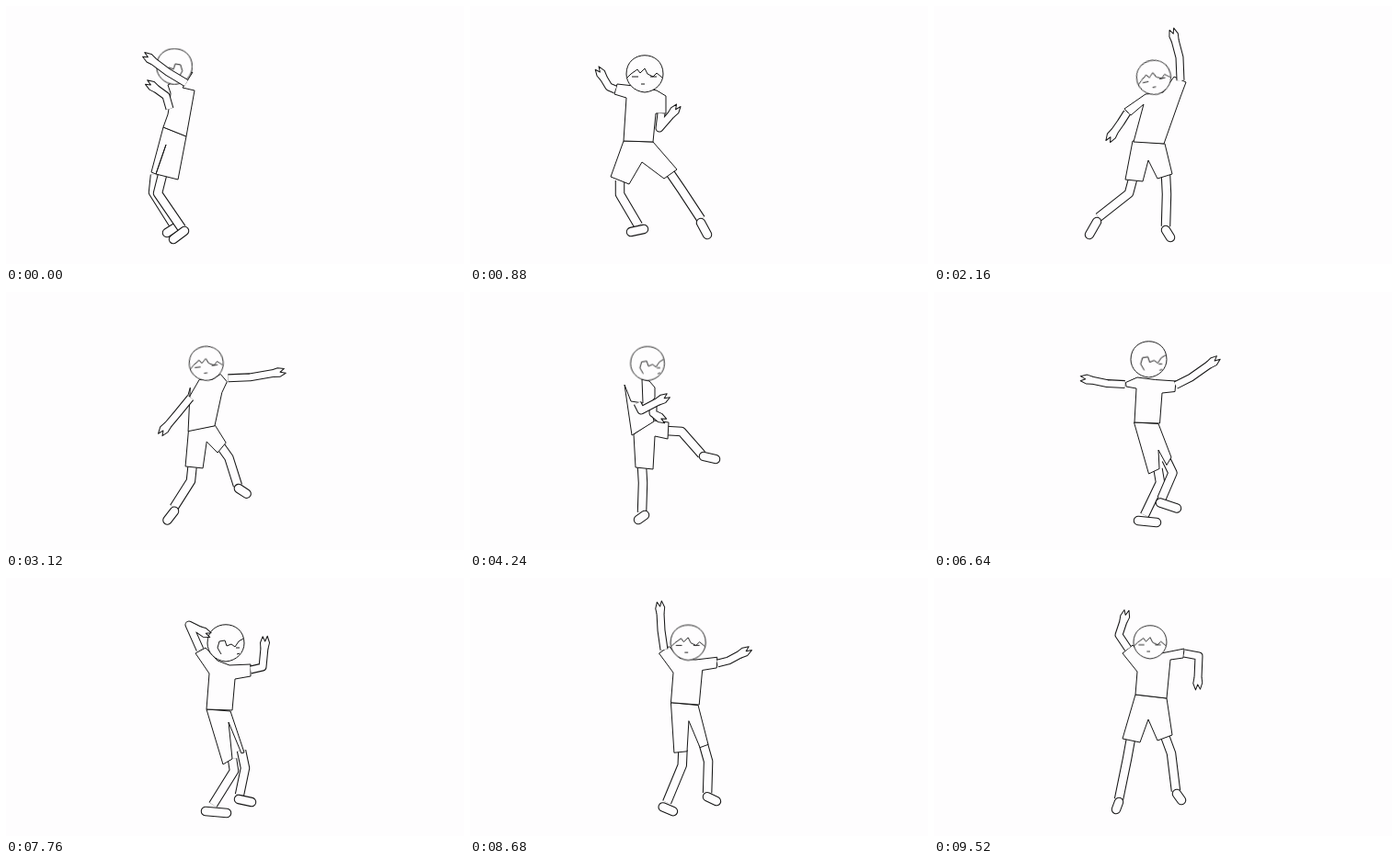
Recreate the animation shown at these times as an HTML page without scripts. Size 498 px wide and 281 px high, loop 9.68 s.

```html
<!DOCTYPE html>
<html lang="en">
<head>
<meta charset="utf-8">
<title>Dancing figure</title>
<style>
html, body { margin: 0; width: 100%; height: 100%; overflow: hidden; background: #fefdfe; }
svg { display: block; width: 100%; height: 100%; }
path { fill: #fefdfe; stroke: #161616; stroke-linejoin: round; }
g, path { animation: 0s steps(8) infinite; animation-duration: 9680ms; }

/* a limb is a wide dark line with a narrower light one on top */
.limb path { fill: none; stroke-width: 10.5px; }
.limb path + path { stroke: #fefdfe; stroke-width: 8.4px; }
.arm path { stroke-width: 9px; animation-timing-function: steps(4); }
.arm path + path { stroke-width: 6.9px; marker-end: url(#hand); }
.foot path { stroke-linecap: round; }

.leg-l path { animation-name: leg-l }
.leg-r path { animation-name: leg-r }
.foot-l path { animation-name: foot-l }
.foot-r path { animation-name: foot-r }
.arm-l path { animation-name: arm-l }
.arm-r path { animation-name: arm-r }
.shorts { animation-name: shorts }
.shirt { animation-name: shirt }
.head { animation-name: head }
.face { fill: none; opacity: 0; animation-timing-function: step-end }
.left { animation-name: left }
.front { animation-name: front }
.right { animation-name: right }

@keyframes leg-l {
  from, .82% { d: path("M162 184 160 203 182 238"); animation-timing-function: steps(5, jump-both) }
  9.09% { d: path("M163 190 163 205 183 239") }
  22.31% { d: path("M216 189 212 204 179 230"); animation-timing-function: steps(13) }
  43.8% { d: path("M187 190 188 208 187 240") }
  57.02% { d: path("M241 188 244 205 233 239"); animation-timing-function: steps(14) }
  80.16% { d: path("M246 197 248 210 225 247"); animation-timing-function: steps(12, jump-none) }
  to { d: path("M214 175 210 197 201 241") }
}
@keyframes leg-r {
  from, .82% { d: path("M170 184 165 204 191 242"); animation-timing-function: steps(5, jump-both) }
  9.09% { d: path("M217 181 230 200 251 232") }
  22.31% { d: path("M252 184 253 205 252 240"); animation-timing-function: steps(13) }
  43.8% { d: path("M213 151 230 152 252 177") }
  57.02% { d: path("M249 177 259 187 241 214"); animation-timing-function: steps(14) }
  80.16% { d: path("M256 188 260 207 254 236"); animation-timing-function: steps(12, jump-none) }
  to { d: path("M251 172 258 191 263 232") }
}
@keyframes foot-l {
  from, .82% { d: path("M183 242 175 247"); animation-timing-function: steps(5, jump-both) }
  9.09% { d: path("M189 243 175 246") }
  22.31% { d: path("M177 235 169 249"); animation-timing-function: steps(13) }
  43.8% { d: path("M190 243 183 248") }
  57.02% { d: path("M227 244 244 246"); animation-timing-function: steps(14) }
  80.16% { d: path("M217 254 240 256"); animation-timing-function: steps(12, jump-none) }
  to { d: path("M201 244 198 252") }
}
@keyframes foot-r {
  from, .82% { d: path("M194 245 182 254"); animation-timing-function: steps(5, jump-both) }
  9.09% { d: path("M251 236 258 249") }
  22.31% { d: path("M252 244 257 252"); animation-timing-function: steps(13) }
  43.8% { d: path("M254 179 267 182") }
  57.02% { d: path("M239 218 261 227"); animation-timing-function: steps(14) }
  80.16% { d: path("M253 241 267 244"); animation-timing-function: steps(12, jump-none) }
  to { d: path("M264 235 269 242") }
}
@keyframes shorts {
  from, .82% { d: path("M171 132 158 181 163 183 174 151 163 183 187 189 196 142Z"); animation-timing-function: steps(5, jump-both) }
  9.09% { d: path("M167 147 153 186 173 194 187 170 211 188 225 178 199 148Z") }
  22.31% { d: path("M216 147 208 189 227 191 233 168 243 188 259 183 251 150Z"); animation-timing-function: steps(13) }
  43.8% { d: path("M178 155 180 191 199 193 201 157 215 160 216 142 200 140Z") }
  57.02% { d: path("M217 141 231 193 244 188 246 187 250 186 257 170 244 142Z"); animation-timing-function: steps(14) }
  80.16% { d: path("M218 143 236 203 246 197 242 157 256 191 259 190 244 145Z"); animation-timing-function: steps(12, jump-none) }
  to { d: path("M219 127 205 175 224 179 233 154 243 177 259 171 253 131Z") }
}
@keyframes shirt {
  from, .82% { d: path("M176 86 179 95 178 106 176 118 171 132 196 142 205 92 192 89 198 80 203 72Z"); animation-timing-function: steps(5, jump-both) }
  9.09% { d: path("M178 87 160 85 157 96 170 100 167 147 199 148 202 117 213 117 213 98 203 92Z") }
  22.31% { d: path("M230 96 207 112 214 119 228 107 217 148 250 150 268 99 274 83 261 77 249 94Z"); animation-timing-function: steps(13) }
  43.8% { d: path("M187 95 188 121 175 119 168 101 176 156 200 141 196 122 201 115 201 104 195 97Z") }
  57.02% { d: path("M212 96 200 121 212 124 219 106 218 141 245 142 247 110 258 110 260 100 238 96Z"); animation-timing-function: steps(14) }
  80.16% { d: path("M230 90 217 76 206 82 221 104 218 143 246 144 249 110 266 107 266 94 243 95Z"); animation-timing-function: steps(12, jump-none) }
  to { d: path("M226 84 216 73 205 82 221 102 219 127 253 131 257 89 271 87 272 77 247 82Z") }
}
@keyframes head {
  from, .82% { transform: translate(183px, 66px) rotate(0deg) scale(.97); animation-timing-function: steps(5, jump-both) }
  9.09% { transform: translate(190px, 74px) rotate(0deg) scale(1) }
  22.31% { transform: translate(239px, 78px) rotate(-13deg) scale(.93); animation-timing-function: steps(13) }
  43.8% { transform: translate(193px, 78px) rotate(0deg) scale(.92) }
  57.02% { transform: translate(228px, 76px) rotate(0deg) scale(.95); animation-timing-function: steps(14) }
  80.16% { transform: translate(239px, 71px) rotate(0deg) scale(1); animation-timing-function: steps(12, jump-none) }
  to { transform: translate(235px, 70px) rotate(0deg) scale(.9) }
}
@keyframes left { from { opacity: 1 } 4.13%, to { opacity: 0 } }
@keyframes front { 4.13%, 88.42% { opacity: 1 } from, 33.88% { opacity: 0 } to { opacity: 1 } }
@keyframes right { 33.88% { opacity: 1 } from, 88.42%, to { opacity: 0 } }

/* cuff, elbow, wrist */
@keyframes arm-l {
  from, .82% { d: path("M178 112 174 98 163 90"); animation-timing-function: steps(2, jump-both) }
  4.13% { d: path("M166 97 146 94 130 89"); animation-timing-function: steps(3) }
  9.09% { d: path("M158 91 151 88 145 78") }
  15.7% { d: path("M184 104 165 104 138 104") }
  22.31% { d: path("M210 116 203 127 196 137"); animation-timing-function: steps(7) }
  33.88% { d: path("M199 115 184 133 172 147"); animation-timing-function: steps(6) }
  43.8% { d: path("M182 121 186 129 205 119"); animation-timing-function: steps(8) }
  57.02% { d: path("M206 122 195 138 185 149"); animation-timing-function: steps(6) }
  66.94% { d: path("M207 105 186 108 167 108"); animation-timing-function: steps(5) }
  75.2% { d: path("M210 83 198 66 190 49"); animation-timing-function: steps(3) }
  80.16% { d: path("M211 78 199 51 211 57"); animation-timing-function: steps(5) }
  88.42% { d: path("M211 78 208 57 207 38"); animation-timing-function: steps(7, jump-none) }
  to { d: path("M211 77 201 62 206 47") }
}
@keyframes arm-r {
  from, .82% { d: path("M196 84 176 72 160 60"); animation-timing-function: steps(2, jump-both) }
  4.13% { d: path("M205 100 205 116 205 131"); animation-timing-function: steps(3) }
  9.09% { d: path("M208 117 206 133 219 118") }
  15.7% { d: path("M238 99 265 94 289 87") }
  22.31% { d: path("M268 81 267 56 262 37"); animation-timing-function: steps(7) }
  33.88% { d: path("M237 96 265 99 296 97"); animation-timing-function: steps(6) }
  43.8% { d: path("M199 121 199 132 202 134"); animation-timing-function: steps(8) }
  57.02% { d: path("M259 105 266 104 262 91"); animation-timing-function: steps(6) }
  66.94% { d: path("M262 102 280 99 304 92"); animation-timing-function: steps(5) }
  75.2% { d: path("M266 100 276 70 281 27"); animation-timing-function: steps(3) }
  80.16% { d: path("M266 100 279 97 281 76"); animation-timing-function: steps(5) }
  88.42% { d: path("M269 93 281 90 294 83"); animation-timing-function: steps(7, jump-none) }
  to { d: path("M272 82 288 85 287 109") }
}
</style>
</head>
<body>
<svg viewBox="0 0 498 281" preserveAspectRatio="none">
  <marker id="hand" orient="auto" markerUnits="userSpaceOnUse" markerWidth="20" markerHeight="20" overflow="visible">
    <path d="M-1-4 5-5 12-3 7 0 13 2 6 5-1 4"/>
  </marker>
  <g class="limb leg-l"><path/><path/></g>
  <g class="limb foot foot-l"><path/><path/></g>
  <g class="limb leg-r"><path/><path/></g>
  <g class="limb foot foot-r"><path/><path/></g>
  <path class="shorts"/>
  <path class="shirt"/>
  <g class="head">
    <path d="M-20 0C-20-27 20-27 20 0C20 10 12 19 0 20C-12 19-20 10-20 0Z"/>
    <path class="face front" d="M-19 4-15 0-8-5-5-1 0-6 3 0 9 3 13-1 19 4M-14 3H-7M6 3H13M-4 11H0"/>
    <g transform="scale(-1 1)"><path class="face left" d="M-5 12-9 5-7-2-1-3 1 3 6 1 10 4 14-2 19-5"/></g>
    <path class="face right" d="M-5 12-9 5-7-2-1-3 1 3 6 1 10 4 14-2 19-5M11 5H15M12 12 15 11"/>
  </g>
  <g class="limb arm arm-r"><path/><path/></g>
  <g class="limb arm arm-l"><path/><path/></g>
</svg>
</body>
</html>
```
